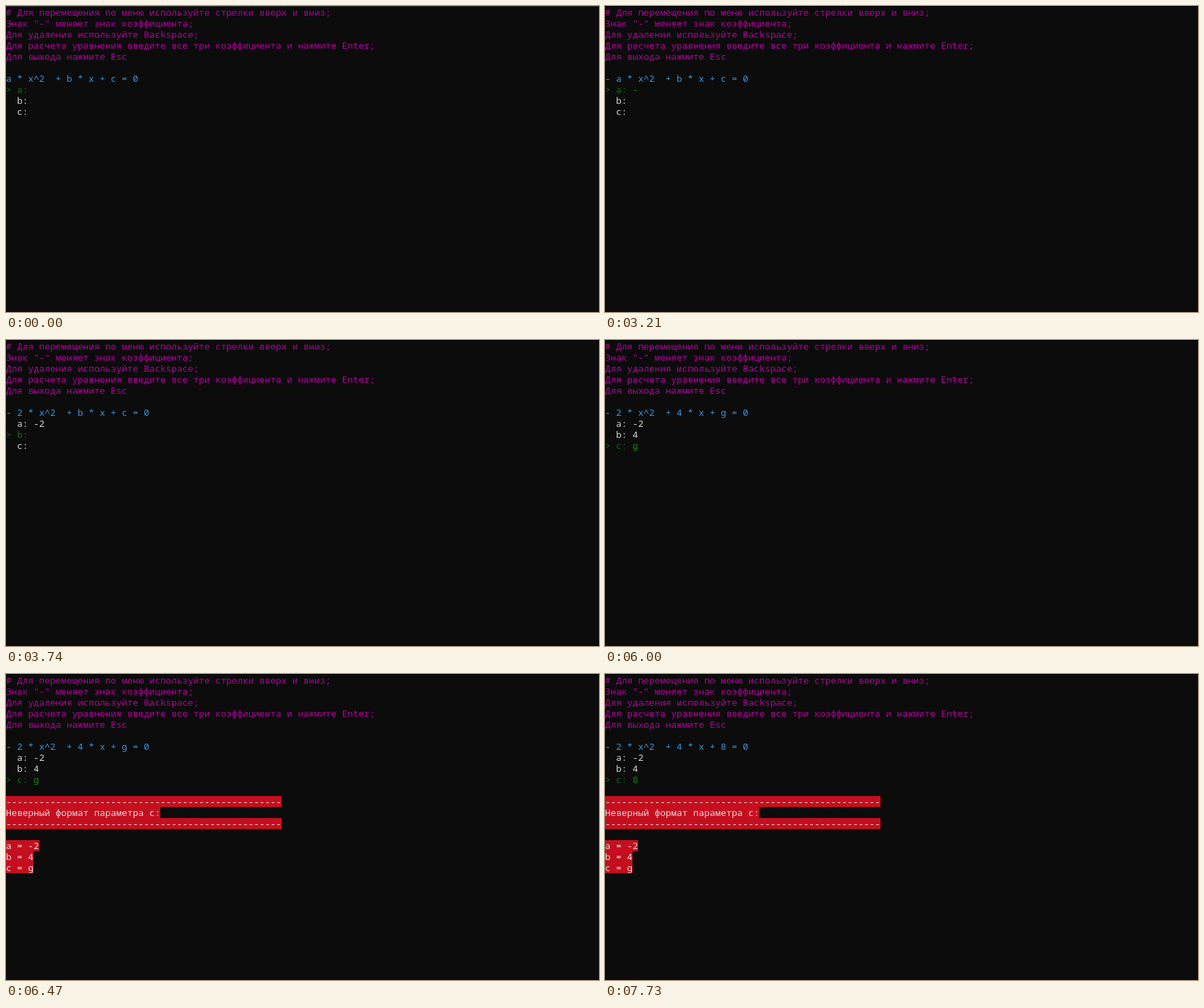
Animation, 861 px wide and 444 px high, one loop 8000 ms. Source, as an HTML page:

```html
<!DOCTYPE html>
<html lang="ru">
<head>
<meta charset="utf-8">
<title>Квадратное уравнение</title>
<style>
html, body { margin: 0; width: 100%; height: 100%; overflow: hidden; background: #0c0c0c; }
#edge { position: absolute; top: 0; left: 0; width: 100%; height: 1px; }
pre {
  position: absolute; top: 1px; left: 0; margin: 0;
  font: 13.3333px/16px "Noto Sans Mono", "DejaVu Sans Mono", monospace;
  font-variant-ligatures: none; color: #d8d8d8;
}
pre span { display: inline-block; height: 16px; vertical-align: top; }
.help { color: #b4009e; }
.equation { color: #3a96dd; }
.active { color: #16691a; }
.active b { font-weight: normal; color: #138a14; }
.error { background: #c50f1f; color: #e6dcdc; }
</style>
</head>
<body>
<div id="edge"></div>
<pre id="screen"></pre>
<script>
const LOOP = 8000, ERROR_AT = 6470;

// [time, selected row, a, b, c]
const steps = [
  [0, 'a', '', '', ''],
  [3210, 'a', '-', '', ''],
  [3340, 'a', '-2', '', ''],
  [3740, 'b', '-2', '', ''],
  [4070, 'b', '-2', '4', ''],
  [4540, 'c', '-2', '4', ''],
  [6000, 'c', '-2', '4', 'g'],
  [7130, 'c', '-2', '4', ''],
  [7730, 'c', '-2', '4', '8']
];

const help = [
  '# Для перемещения по меню используйте стрелки вверх и вниз;',
  'Знак "-" меняет знак коэффициента;',
  'Для удаления используйте Backspace;',
  'Для расчета уравнения введите все три коэффициента и нажмите Enter;',
  'Для выхода нажмите Esc'
];
const rule = '-'.repeat(50);
const errors = [rule, 'Неверный формат параметра c:', rule, '', 'a = -2', 'b = 4', 'c = g'];

const screen = document.getElementById('screen');
const edge = document.getElementById('edge');
const paint = (cls, text) => text && `<span class="${cls}">${text}</span>`;

function equation(a, b, c) {
  const sign = a.startsWith('-') ? '- ' : '';
  return `${sign}${a.replace('-', '') || 'a'} * x^2  + ${b || 'b'} * x + ${c || 'c'} = 0`;
}

function field(name, value, selected) {
  if (name !== selected) return `  ${name}: ${value}`;
  return paint('active', `&gt; ${name}: <b>${value}</b>`);
}

function render(t) {
  const [, selected, a, b, c] = steps.findLast(step => step[0] <= t);
  const lines = [
    ...help.map(line => paint('help', line)),
    '',
    paint('equation', equation(a, b, c)),
    field('a', a, selected),
    field('b', b, selected),
    field('c', c, selected)
  ];
  if (t >= ERROR_AT) lines.push('', ...errors.map(line => paint('error', line)));
  return lines.join('\n');
}

let shown;
function frame(now) {
  const t = now % LOOP;
  const html = render(t);
  if (html !== shown) screen.innerHTML = shown = html;
  edge.style.background = t < 400 ? '#333' : '#000';
  requestAnimationFrame(frame);
}
frame(0);
</script>
</body>
</html>
```
